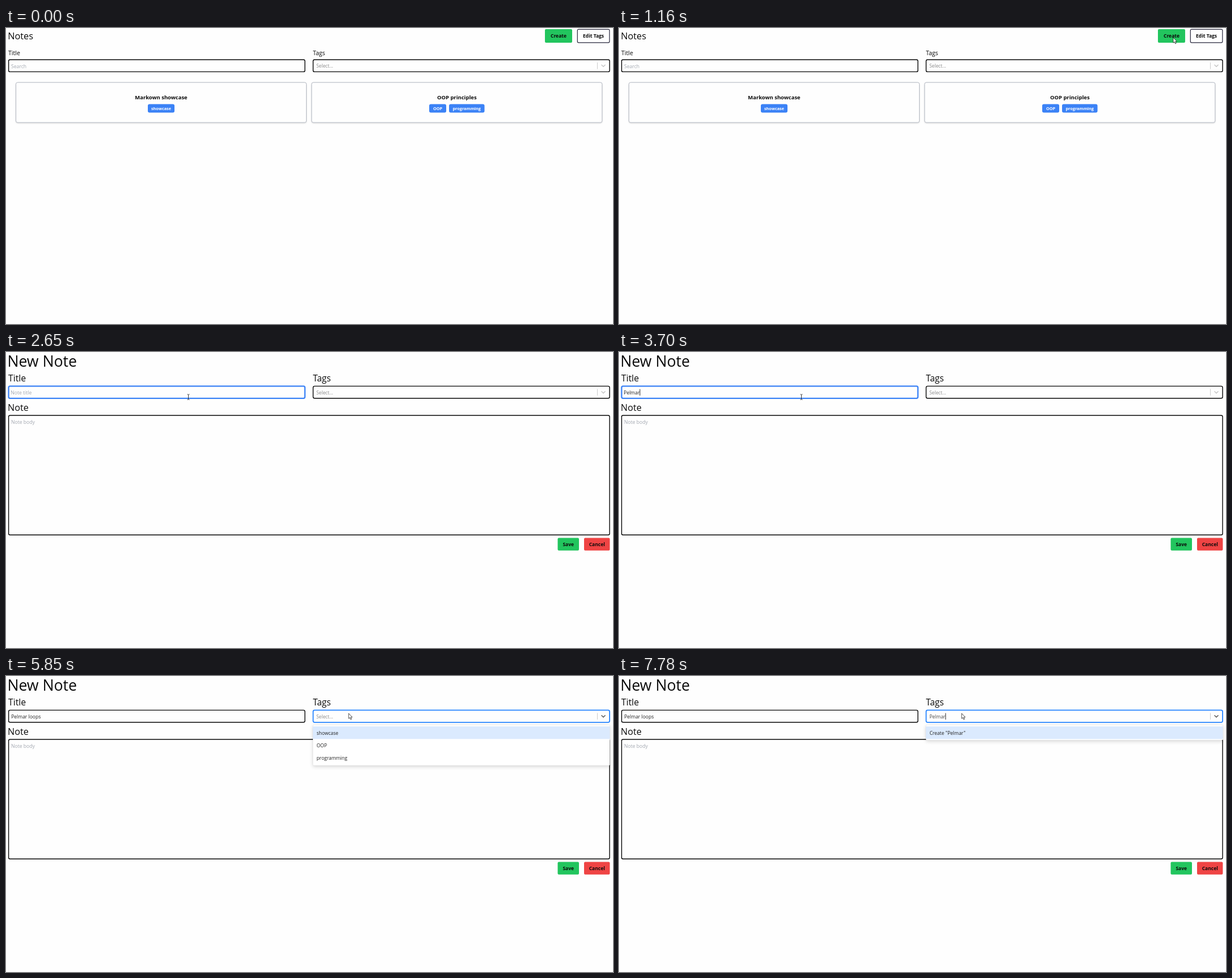
An HTML page that plays this animation: 1070 by 523 pixels, repeating every 8000 ms.

```html
<!DOCTYPE html>
<html lang="en">
<head>
<meta charset="utf-8">
<title>Notes</title>
<style>
  html, body { margin: 0; width: 100%; height: 100%; overflow: hidden; background: #fefefe; }
  svg { display: block; width: 1070px; height: 523px; }
  text { font-family: "Open Sans", "Noto Sans", sans-serif; fill: #0b0b0b; white-space: pre; }
  .bold { font-weight: 700; text-anchor: middle; }
  .hint { fill: #a3a8b1; font-size: 8.6px; }
  .pick { fill: #8a8a8a; font-size: 8.4px; }
  .typed { fill: #222; font-size: 8.5px; }
  .box { fill: #fefefe; stroke: #050505; stroke-width: 1.4; }
  .card { fill: #fefefe; stroke: #b3b8c2; stroke-width: 1; filter: drop-shadow(0 1px 1px rgba(0,0,0,.14)); }
  .menu { fill: #fff; stroke: rgba(0,0,0,.1); stroke-width: .6; filter: drop-shadow(0 2px 3px rgba(0,0,0,.16)); }
</style>
</head>
<body>
<svg id="stage" viewBox="0 0 1070 523"></svg>
<script>
const LOOP = 8000;
const GREEN = "#22c55e", RED = "#ef4444", BLUE = "#3b82f6", FOCUS = "#2684ff";
const stage = document.getElementById("stage");

function add(parent, tag, attrs) {
  const el = document.createElementNS("http://www.w3.org/2000/svg", tag);
  for (const key in attrs) el.setAttribute(key, attrs[key]);
  parent.appendChild(el);
  return el;
}
const group = parent => add(parent, "g", {});
const rect = (parent, x, y, width, height, rx, attrs) =>
  add(parent, "rect", { x, y, width, height, rx, ...attrs });
function label(parent, x, y, str, attrs) {
  const el = add(parent, "text", { x, y, ...attrs });
  el.textContent = str;
  return el;
}
const bold = (parent, x, y, str, size, fill = "#0b0b0b") =>
  label(parent, x, y, str, { class: "bold", style: `font-size:${size}px;fill:${fill}` });
const heading = (parent, x, y, str, size) =>
  label(parent, x, y, str, { "font-size": size });
function button(parent, x, y, w, h, str, fill) {
  const look = fill ? { fill } : { fill: "#fefefe", stroke: "#25253a", "stroke-width": 1.2 };
  rect(parent, x, y, w, h, 2, look);
  bold(parent, x + w / 2, y + h / 2 + 3.3, str, 8.5);
}
function select(parent, y) {
  const frame = rect(parent, 541.4, y, 522.6, 21.4, 2.5, { class: "box" });
  const hint = label(parent, 547, y + 14.2, "Select...", { class: "pick" });
  rect(parent, 1042, y + 5, 1, 11.5, 0, { fill: "#ccc" });
  const arrow = add(parent, "path", {
    d: `M1049.9 ${y + 9.3}l3.1 3 3.1-3`, fill: "none", stroke: "#c4c4c4",
    "stroke-width": 1.4, "stroke-linecap": "round"
  });
  return { frame, hint, arrow };
}
function card(parent, x, title, tags) {
  const g = group(parent);
  rect(g, x, 96.2, 512, 70.8, 3, { class: "card" });
  bold(g, x + 256, 126.3, title, 9.45);
  for (const [left, width, name] of tags) {
    rect(g, left, 134.5, width, 15, 3, { fill: BLUE });
    bold(g, left + width / 2, 144.8, name, 7.3, "#fff");
  }
  return g;
}

// list page
const list = group(stage);
heading(list, 3.2, 19.6, "Notes", 16.3);
button(list, 950, 2, 48, 24, "Create", GREEN);
button(list, 1007.3, 2.4, 56.5, 23.4, "Edit Tags");
heading(list, 4, 47.6, "Title", 10.6);
heading(list, 541, 47.6, "Tags", 10.4);
rect(list, 4.6, 56, 522.3, 21.4, 2.5, { class: "box" });
label(list, 9, 70.6, "Search", { class: "hint" });
select(list, 56);
card(list, 17.5, "Markown showcase", [[250, 47, "showcase"]]);
const oopCard = card(list, 538.8, "OOP principles", [[746, 30, "OOP"], [781, 62.5, "programming"]]);

// editor page
const editor = group(stage);
heading(editor, 2.4, 26, "New Note", 26.6);
heading(editor, 4, 52, "Title", 15.8);
heading(editor, 541, 52, "Tags", 15.4);
heading(editor, 3, 103.6, "Note", 16.2);
const titleBox = rect(editor, 4.6, 60.4, 522.3, 21.4, 2.5, { class: "box" });
const titleHint = label(editor, 9, 75, "Note title", { class: "hint" });
const titleText = label(editor, 9, 75, "", { class: "typed" });
const tagBox = select(editor, 60.4);
const tagText = label(editor, 547.2, 74.6, "", { class: "typed", style: "fill:#4a4a4a" });
rect(editor, 4.6, 112, 1059.4, 211.2, 2.5, { class: "box" });
label(editor, 9, 126.8, "Note body", { class: "hint" });
button(editor, 972.5, 328.5, 37.5, 22.3, "Save", GREEN);
button(editor, 1019, 328.5, 45.4, 22.3, "Cancel", RED);

const menu = group(editor);
const menuBox = rect(menu, 541, 86.6, 523.5, 71.5, 2, { class: "menu" });
rect(menu, 541, 89, 523.5, 22.3, 0, { fill: "#dbeafe" });
const rows = [0, 1, 2].map(i => label(menu, 547.4, 103.5 + 22.4 * i, "", { class: "typed" }));

const caret = rect(editor, 0, 65.6, 0.9, 11.4, 0, { fill: "#111" });

// pointers, both with the hot spot at 0,0
const arrow = add(stage, "path", {
  d: "M0 0V9.3L2.1 7.4 3.6 10.8 5.2 10.1 3.7 6.8H6.4Z",
  fill: "#fff", stroke: "#222", "stroke-width": .8, "stroke-linejoin": "round"
});
const beam = add(stage, "path", {
  d: "M-1.9-4.6H-.5L0-4.1 .5-4.6H1.9M0-4.1V4.1M-1.9 4.6H-.5L0 4.1 .5 4.6H1.9",
  fill: "none", stroke: "#222", "stroke-width": .9
});

// time, x, y
const path = [
  [70, 812, 518], [220, 842, 420], [380, 885, 265], [520, 925, 140],
  [660, 968, 55], [810, 990, 20], [880, 988, 19], [1100, 977, 17], [1360, 977, 17],
  [1500, 720, 62], [1630, 452.6, 107.6], [1700, 396, 92], [1830, 321.5, 79.5],
  [5100, 321.5, 79.5], [5240, 510, 62], [5310, 602.8, 59],
  [5400, 602.8, 59], [5640, 604, 66], [LOOP, 604, 66]
];
const WORD = "Pelmar";
const title = { str: WORD + " loops", focus: 2100, blur: 5640,
  keys: [2850, 3180, 3310, 3440, 3570, 3700, 3850, 3980, 4380, 4510, 4640, 4970] };
const tag = { str: WORD, focus: 5920, blur: LOOP,
  keys: [6930, 7260, 7390, 7590, 7690, 7780] };
const PAGE = 1300, OPEN = 5780, BLINK = 525;
const options = ["showcase", "OOP", "programming"];

const show = (el, on) => el.setAttribute("display", on ? "inline" : "none");
const typed = (field, t) => field.str.slice(0, field.keys.filter(k => k <= t).length);

function pointer(t) {
  const i = path.findIndex(p => p[0] > t);
  if (i < 1) return null;
  const [t0, x0, y0] = path[i - 1], [t1, x1, y1] = path[i];
  const k = (t - t0) / (t1 - t0);
  return [x0 + (x1 - x0) * k, y0 + (y1 - y0) * k];
}

function lit(field, t) {
  if (t < field.focus || t >= field.blur) return false;
  const last = field.keys.filter(k => k <= t).pop() || field.focus;
  return Math.floor((t - last) / BLINK) % 2 === 0;
}

function drawTitle(t) {
  const focused = t >= title.focus && t < title.blur;
  const str = typed(title, t);
  titleBox.style.stroke = focused ? BLUE : "";
  titleBox.style.strokeWidth = focused ? 2.3 : "";
  titleHint.setAttribute("x", focused ? 8.3 : 9);
  show(titleHint, !str);
  titleText.setAttribute("x", focused ? 8.3 : 9.2);
  titleText.textContent = str;
}

function drawTags(t) {
  const open = t >= OPEN, str = typed(tag, t);
  tagBox.frame.style.stroke = open ? FOCUS : "";
  tagBox.frame.style.strokeWidth = open ? 1.8 : "";
  tagBox.arrow.style.stroke = open ? "#555" : "";
  show(tagBox.hint, !str);
  tagText.textContent = str;
  show(menu, open);
  const items = options.filter(o => o.toLowerCase().includes(str.toLowerCase()));
  if (str) items.push(`Create "${str}"`);
  menuBox.setAttribute("height", 4.5 + 22.4 * items.length);
  rows.forEach((row, i) => { row.textContent = items[i] || ""; });
}

function drawCaret(t) {
  const inTitle = t < title.blur;
  show(caret, lit(inTitle ? title : tag, t));
  const el = inTitle ? titleText : tagText;
  const width = el.textContent ? el.getComputedTextLength() : 0;
  caret.setAttribute("x", +el.getAttribute("x") + width);
}

function drawPointer(t) {
  const p = pointer(t);
  const text = p && t >= PAGE && p[0] < 527 && p[1] > 60 && p[1] < 82;
  show(arrow, p && !text);
  show(beam, text);
  if (p) (text ? beam : arrow).setAttribute("transform", `translate(${p[0]} ${p[1]})`);
}

function render(t) {
  show(list, t < PAGE);
  show(editor, t >= PAGE);
  const lift = Math.max(0, 1 - Math.abs(t - 570) / 130);
  oopCard.setAttribute("transform", `translate(0 ${-2.5 * lift})`);
  drawTitle(t);
  drawTags(t);
  drawCaret(t);
  drawPointer(t);
}

const start = performance.now();
function tick() {
  render((performance.now() - start) % LOOP);
  requestAnimationFrame(tick);
}
tick();
</script>
</body>
</html>
```
